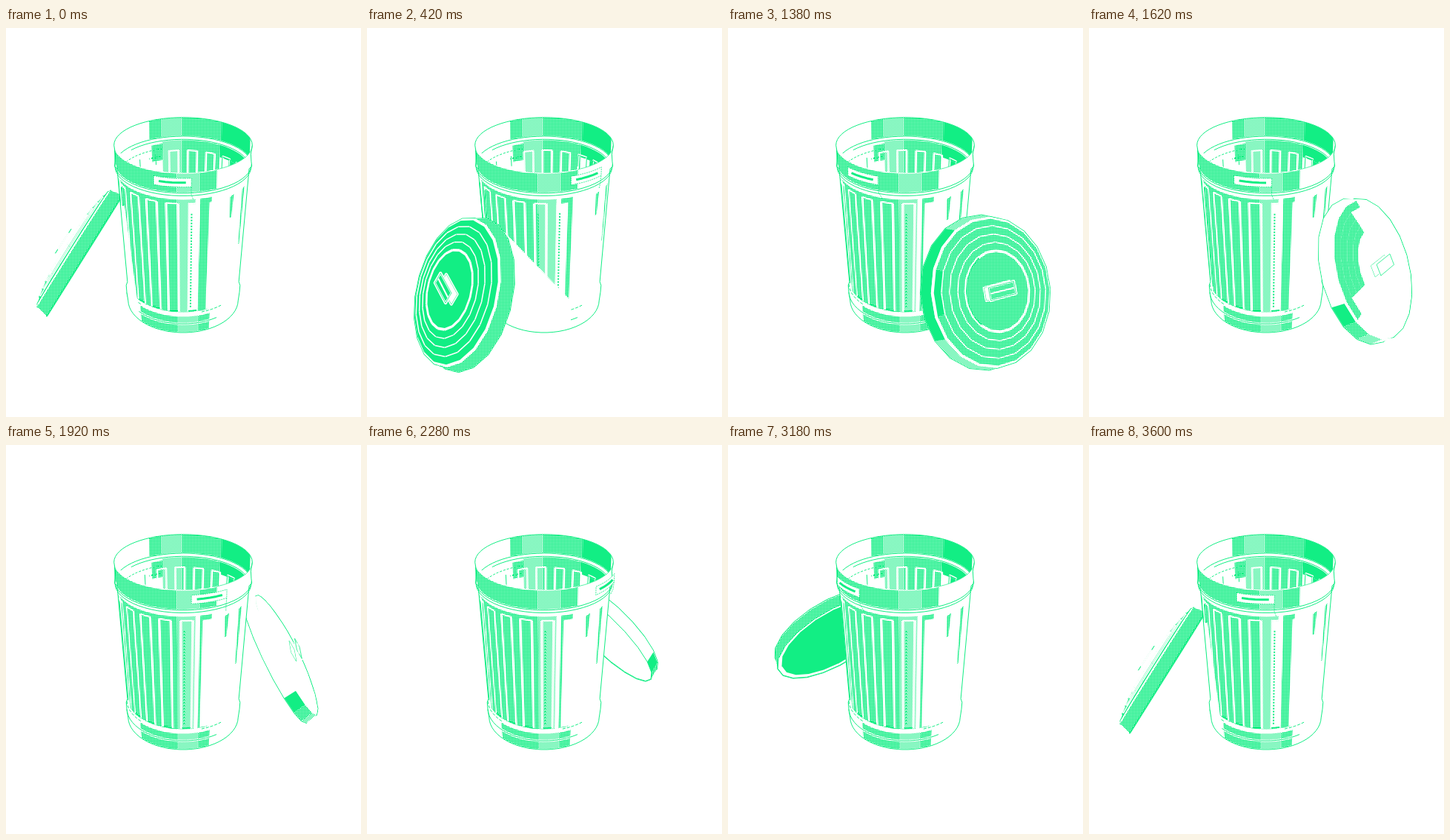
Write an HTML page with a canvas that moves like this. It is 479x525 px and loops after 3.66 s.

```html
<!DOCTYPE html>
<html lang="en">
<head>
<meta charset="utf-8">
<title>Trash can</title>
<style>
html, body { margin: 0; width: 100%; height: 100%; overflow: hidden; background: #fff; }
canvas { display: block; width: 479px; height: 525px; }
</style>
</head>
<body>
<canvas id="stage" width="479" height="525"></canvas>
<script>
const ctx = document.getElementById('stage').getContext('2d');
const GREEN = '#12ee84', WHITE = '#fff';
const STEP = 60, STEPS = 61;
const rad = d => d * Math.PI / 180;
const sin = d => Math.sin(rad(d)), cos = d => Math.cos(rad(d));

// 2 x 2 screens: each cell is on or off
function screen(cells) {
  const c = document.createElement('canvas');
  c.width = c.height = 2;
  const g = c.getContext('2d');
  g.fillStyle = WHITE;
  g.fillRect(0, 0, 2, 2);
  g.fillStyle = GREEN;
  cells.forEach((on, i) => on && g.fillRect(i % 2, i >> 1, 1, 1));
  return ctx.createPattern(c, 'repeat');
}
const DENSE = screen([1, 1, 1, 0]);
const LIGHT = screen([1, 0, 0, 1]);

// camera: x right, y up, z towards the viewer, origin at the middle of the mouth
function project(x, y, z) {
  const up = y * 0.9165 - z * 0.4;
  const s = 1000 / (1000 - y * 0.4 - z * 0.9165);
  return [239 + x * s, 155 - up * s];
}

function trace(pts, close) {
  pts.forEach((p, i) => i ? ctx.lineTo(p[0], p[1]) : ctx.moveTo(p[0], p[1]));
  if (close) ctx.closePath();
}
function fill(pts, tone) {
  ctx.beginPath();
  trace(pts, true);
  ctx.fillStyle = tone;
  ctx.fill();
}
function line(pts, color = GREEN, w = 1, close = false) {
  ctx.beginPath();
  trace(pts, close);
  ctx.strokeStyle = color;
  ctx.lineWidth = w;
  ctx.stroke();
}

// the can's outline as [depth below the mouth, radius]
const profile = [[0, 93], [13, 91.5], [24, 92.5], [31, 93.5], [35, 90],
  [218, 81.5], [224, 83.5], [236, 83], [251, 81.5]];
function radius(h) {
  let i = 1;
  while (i < profile.length - 1 && profile[i][0] < h) i++;
  const [h0, r0] = profile[i - 1], [h1, r1] = profile[i];
  return r0 + (r1 - r0) * (h - h0) / (h1 - h0);
}
const at = (az, h, r = radius(h)) => project(r * sin(az), -h, r * cos(az));
function arc(a0, a1, h, r) {
  const n = Math.max(1, Math.ceil(Math.abs(a1 - a0) / 6));
  return Array.from({ length: n + 1 }, (_, i) => at(a0 + (a1 - a0) * i / n, h, r));
}
const wall = (a0, a1, h0, h1, tone) => {
  if (a1 > a0) fill([...arc(a0, a1, h0), ...arc(a1, a0, h1)], tone);
};
const bands = (list, h0, h1) => list.forEach(([a0, a1, tone]) => wall(a0, a1, h0, h1, tone));

const EDGE = 85;
const side = s => profile.map(([h, r]) => at(s * EDGE, h, r));
const hull = [...side(-1), ...arc(-EDGE, EDGE, 251), ...side(1).reverse(), ...arc(EDGE, 360 - EDGE, 0)];

function ribs(turn, draw) {
  for (let k = 0; k < 20; k++) draw(((turn - 9 + 18 * k + 180) % 360 + 360) % 360 - 180);
}

function inside(turn) {
  ctx.save();
  ctx.beginPath();
  trace(arc(0, 360, 0), true);
  ctx.clip();
  bands([[181, 200, LIGHT], [143, 181, DENSE]], 35, 110);
  wall(200, 211, 38, 64, DENSE);
  wall(105, 143, 35, 54, GREEN);
  wall(106, 132, 54, 70, GREEN);
  ribs(turn, c => {
    const b = c < 0 ? c + 360 : c;
    if (b < 105 || b > 250) return;
    if (b < 203) {
      wall(b - 5.5, b - 3.5, 51, 110, WHITE);
      wall(b + 3.5, b + 5.5, 51, 110, WHITE);
      line(arc(b - 5, b + 5, 51), WHITE, 2);
    } else {
      line([at(b, 54), at(b, 70)]);
    }
    if (b < 143) line([at(b - 5, 70), at(b - 5, 52), at(b + 5, 52), at(b + 5, 70)]);
  });
  ctx.setLineDash([3, 2]);
  line(arc(200, 246, 46));
  line(arc(202, 214, 58), GREEN, 2);
  ctx.setLineDash([]);
  wall(95, 265, 0, 34, WHITE);
  bands([[200, 212, DENSE], [181, 200, LIGHT], [143, 181, DENSE], [99, 143, GREEN]], 0, 29);
  line(arc(105, 250, 30));
  line(arc(105, 235, 34));
  ctx.restore();
}

function body(turn) {
  bands([[-68, -5, DENSE], [-5, 10, LIGHT], [14, 24, DENSE]], 39, 217);
  wall(-82, -74, 42, 205, DENSE);
  ribs(turn, c => {
    if (Math.abs(c) > 80) return;
    const l = c - 5, r = c + 5;
    if (c > 5 && c < 32) wall(l, r, 46, 216, WHITE);
    else if (c < 5) {
      wall(l - 1, l + 1.2, 45, 216, WHITE);
      wall(r - 1.2, r + 1, 45, 216, WHITE);
    }
    if (c < 12) line(arc(l, r, 45), WHITE, 2);
    if (c < -54) line([at(l, 50), at(l, 210)]);
    if (c > -4 && c < 20) {
      ctx.setLineDash([2, 2]);
      line([at(c - 2, 60), at(c - 2, 210)], GREEN, 2);
      ctx.setLineDash([]);
    }
    if (c > -62 && c < 18) line(arc(c - 4, c + 4, 215), GREEN, 2);
    if (c > 36 && c < 72) {
      const len = c < 54 ? 34 : 88;
      fill([at(c - 2, 48), at(c + 2.5, 46), at(c + 1, 46 + len), at(c - 1, 46 + len)], DENSE);
    }
  });
  bands([[-46, -5, DENSE], [-5, 15, LIGHT], [15, 26, DENSE]], 223, 250);
  line(arc(-84, 34, 235), WHITE, 3);
  line(arc(-84, 34, 235));
  ctx.setLineDash([4, 2]);
  line(arc(-84, -45, 221));
  line(arc(18, 40, 219));
  ctx.setLineDash([]);
}

// pale patch that the lid throws on the can
function shade(turn) {
  const t = turn > 300 ? turn - 360 : turn;
  if (t < -30 || t > 102) return;
  const u = t / 42, bx = 183 + 92 * u;
  ctx.save();
  ctx.beginPath();
  trace(hull, true);
  ctx.clip();
  fill([[160 + 25 * u, 240 + 35 * u], [bx, 410 - 42 * u], [bx, 450], [60, 450], [60, 240]], WHITE);
  ctx.restore();
}

function lip() {
  wall(-EDGE, EDGE, 0, 34, WHITE);
  bands([[-83, -5, DENSE], [-5, 13, LIGHT], [13, 27, DENSE]], 1, 27);
  line(arc(-EDGE, EDGE, 29), WHITE, 4);
  line(arc(-EDGE, EDGE, 28));
  line(arc(-EDGE, EDGE, 32));
  line(arc(27, EDGE, 0), GREEN, 0.7);
}

function grip(az) {
  const l = az - 14, r = az + 14;
  if (Math.abs(cos(az)) < 0.5) {
    for (const a of [l, r]) line([at(a, 2, 93), at(a, 8, 101), at(a, 40, 101), at(a, 42, 97), at(a, 20, 95)]);
    line(arc(l, r, 8, 101));
    return;
  }
  const box = [...arc(l, r, 5, 98), ...arc(r, l, 17, 98)];
  fill(box, WHITE);
  ctx.setLineDash([2, 1]);
  line(box, GREEN, 0.8, true);
  line([at(r, 17, 98), at(r, 28, 97), at(r + 2, 38, 93)], GREEN, 0.8);
  ctx.setLineDash([]);
  line(arc(az - 10, az + 10, 11, 98), GREEN, 3);
}

function can(turn) {
  const grips = [turn - 8, turn - 172];
  grips.filter(a => cos(a) <= 0 && cos(a) > -0.5).forEach(grip);
  fill(hull, WHITE);
  inside(turn);
  body(turn);
  shade(turn);
  lip();
  line(hull, GREEN, 1, true);
  grips.filter(a => cos(a) > 0).forEach(grip);
}

// the lid's outline as [radius, height], from the rim to the flat middle
const SIDES = 20, LEAN = 30;
const dome = [[101, -13], [97, 5], [94, 7], [84, 10], [73, 12], [62, 14], [52, 15]];

function lid(turn) {
  const a = turn - 102, b = turn - 90;
  const sa = sin(a), ca = cos(a), sl = sin(LEAN), cl = cos(LEAN);
  const nx = sa * cl;
  const pos = (u, v, k) => project(
    152 * sin(b) + u * ca - v * sa * sl + k * sa * cl,
    -168 + v * cl + k * sl,
    152 * cos(b) - u * sa - v * ca * sl + k * ca * cl);
  const pt = ([r, k], i) => pos(r * cos(i * 360 / SIDES), r * sin(i * 360 / SIDES), k);
  const loop = ring => Array.from({ length: SIDES }, (_, i) => pt(ring, i));
  // how far a facet's outward direction points right, and towards the viewer
  const right = i => ca * cos(i * 360 / SIDES) - sa * sl * sin(i * 360 / SIDES);
  const near = i => -sa * cos(i * 360 / SIDES) - ca * sl * sin(i * 360 / SIDES);
  const area = p => p.reduce((s, q, i) => {
    const n = p[(i + 1) % p.length];
    return s + q[0] * n[1] - n[0] * q[1];
  }, 0);

  const faceTone = x => x < 0.18 ? GREEN : x < 0.64 ? DENSE : WHITE;
  function skirtTone(i) {
    if (nx > 0.7) {
      const v = sin(i * 360 / SIDES);
      if (near(i) < 0.5 || v > 0.1 || v < -0.85) return WHITE;
      return v > -0.2 ? GREEN : v > -0.65 ? DENSE : LIGHT;
    }
    const x = nx + 0.5 * right(i);
    return x > 0.75 ? WHITE : x > 0.2 ? LIGHT : x > -0.1 ? GREEN : DENSE;
  }
  function ringTone(j, i) {
    const t = right(i);
    return faceTone(nx + t * (t > 0 ? 0.1 : j === 2 ? 0.4 : 0.25));
  }

  // facets sharing a tone are filled as one path
  function facets(outer, inner, tone, seam) {
    const groups = new Map(), seams = [];
    for (let i = 0; i < SIDES; i++) {
      const quad = [pt(outer, i), pt(outer, i + 1), pt(inner, i + 1), pt(inner, i)];
      if (area(quad) >= 0) continue;
      const key = tone(i + 0.5);
      groups.set(key, [...(groups.get(key) || []), quad]);
      seams.push([quad[2], quad[3], right(i + 0.5)]);
    }
    groups.forEach((quads, key) => {
      ctx.beginPath();
      quads.forEach(q => trace(q, true));
      ctx.fillStyle = key;
      ctx.fill();
    });
    if (!seam) return;
    seams.forEach(([p, q, t]) => {
      line([p, q], WHITE, 3);
      if (nx > 0.18 && nx < 0.64 && t < -0.45) line([[p[0] + 2, p[1]], [q[0] + 2, q[1]]], GREEN, 2);
    });
  }

  function knob() {
    const tilt = 8;
    const box = k => [[-21, -8], [21, -8], [21, 8], [-21, 8]].map(([u, v]) =>
      pos(u * cos(tilt) + v * sin(tilt), v * cos(tilt) - u * sin(tilt), k));
    const low = box(15), high = box(24);
    for (const p of [low, high]) {
      line(p, WHITE, 4, true);
      line(p, GREEN, 1, true);
      fill(p, WHITE);
    }
    fill(high, faceTone(nx));
    line(high, WHITE, 2.5, true);
    line(high, GREEN, 0.8, true);
    line([pos(-19, 3, 24), pos(19, -3, 24)], WHITE, 2);
  }

  const flat = loop(dome[6]), rim = loop(dome[0]);
  const away = area(flat) >= 0;
  if (away) knob();
  dome.forEach(ring => line(loop(ring), GREEN, 2, true));
  dome.forEach(ring => fill(loop(ring), WHITE));
  for (let j = 0; j < 6; j++) {
    facets(dome[j], dome[j + 1],
      i => j === 0 ? skirtTone(i) : j === 1 ? WHITE : ringTone(j, i),
      j > 1 && nx < 0.7);
  }
  if (away) {
    fill(rim, WHITE);
    fill(loop([94, -12]), nx < 0 ? GREEN : WHITE);
    line(rim, GREEN, 1, true);
  } else {
    fill(loop([50, 15]), faceTone(nx));
    knob();
  }
}

function draw(now) {
  const turn = Math.floor(now / STEP) % STEPS * 6 % 360;
  ctx.fillStyle = WHITE;
  ctx.fillRect(0, 0, 479, 525);
  ctx.lineJoin = 'round';
  const front = cos(turn - 90) > 0.05;
  if (!front) lid(turn);
  can(turn);
  if (front) lid(turn);
}

let start;
function tick(now) {
  if (start === undefined) start = now;
  draw(now - start);
  requestAnimationFrame(tick);
}
draw(0);
requestAnimationFrame(tick);
</script>
</body>
</html>
```
